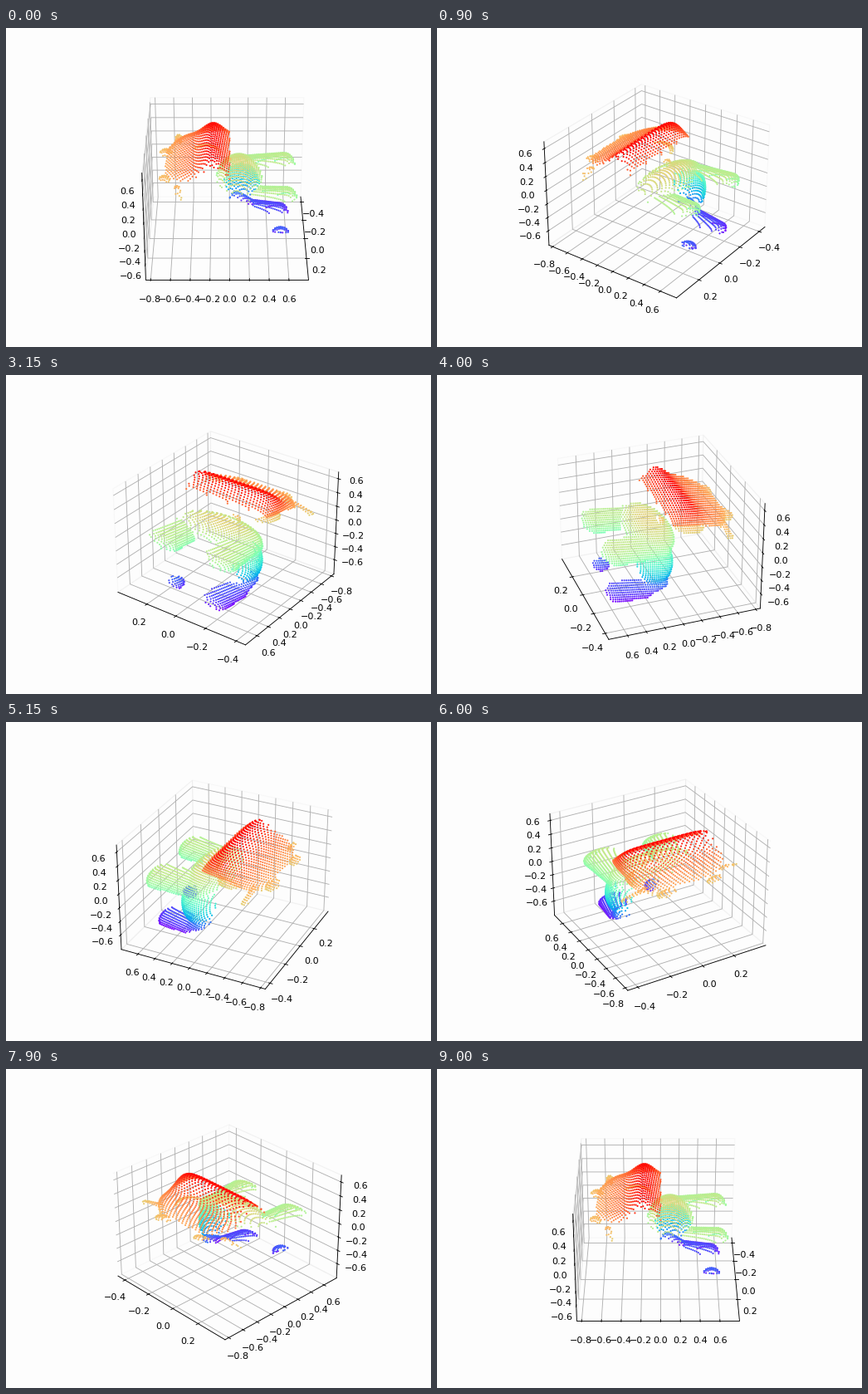
Write a matplotlib script that moves like this. It is 512x384 px and loops after 9050 ms.

```python
import numpy as np
import matplotlib.pyplot as plt
from matplotlib.animation import FuncAnimation

PAPER = "#fdfdfd"
FRAMES = 181
STEP = 0.0195


# --- solids: each returns a function that is negative inside ---
def ellipsoid(center, radii):
    c, r = np.array(center), np.array(radii)
    return lambda p: (((p - c) / r) ** 2).sum(-1) - 1


def capsule(a, b, radius):
    a, b = np.array(a), np.array(b)
    ab = b - a

    def f(p):
        t = np.clip((p - a) @ ab / (ab @ ab), 0, 1)
        return np.linalg.norm(p - a - t[..., None] * ab, axis=-1) - radius
    return f


def union(*parts):
    return lambda p: np.min([f(p) for f in parts], axis=0)


def shell(p):
    """Humped cover: a ridge along x, a bell-shaped profile along y."""
    x, y, z = p[..., 0], p[..., 1], p[..., 2]
    top = .42 - .6 * (y + .2) ** 2 + .17 * np.exp(-((y + .17) / .14) ** 2)
    half = .305 - 2.5 * np.clip(-.42 - y, 0, .24) ** 2
    base = .375 - .45 * y ** 2
    rise = np.clip(z - .2, 0, None) / np.maximum(top - .2, .01)
    body = np.abs((x + .015) / half) ** 6 + rise ** 4 - 1
    return np.maximum.reduce([body, base - z, y, -.66 - y])


def scan(solid, azim=np.radians(172), elev=np.radians(50)):
    """Depth-camera view of a solid: first hit along a grid of parallel rays."""
    ca, sa, ce, se = np.cos(azim), np.sin(azim), np.cos(elev), np.sin(elev)
    eye = np.array([ca * ce, sa * ce, se])
    right = np.array([-sa, ca, 0])
    up = np.array([-ca * se, -sa * se, ce])
    g = np.arange(-0.95, 0.95, STEP)
    u, v = (m.ravel()[:, None] for m in np.meshgrid(g, g))
    start = u * right + v * up
    depth = np.linspace(0.85, -0.85, 171)
    hit = np.full(len(start), np.nan)
    for t in depth:
        todo = np.flatnonzero(np.isnan(hit))
        inside = solid(start[todo] + t * eye) < 0
        hit[todo[inside]] = t
    ok = ~np.isnan(hit)
    start, low = start[ok], hit[ok]
    high = low + depth[0] - depth[1]
    for _ in range(7):
        mid = (low + high) / 2
        inside = solid(start + mid[:, None] * eye) < 0
        low, high = np.where(inside, mid, low), np.where(inside, high, mid)
    return start + low[:, None] * eye


seat = union(
    ellipsoid((-.02, .10, .03), (.27, .24, .17)),
    capsule((-.09, 0, .15), (-.09, -.01, .22), .03),
    capsule((-.18, .08, -.01), (-.20, .58, .015), .115),
    capsule((.15, .08, -.01), (.17, .58, .005), .11),
    ellipsoid((-.18, .13, -.22), (.12, .19, .33)),
    capsule((-.19, .08, -.50), (-.17, .25, -.62), .08),
    capsule((-.17, .25, -.62), (-.15, .54, -.64), .09),
)
cover = union(shell, ellipsoid((-.18, -.25, .20), (.10, .16, .07)))
tips = [
    capsule((-.26, -.55, .26), (-.37, -.55, .20), .035),
    capsule((.24, -.53, .24), (.32, -.51, .19), .035),
    ellipsoid((-.16, -.67, .22), (.06, .07, .045)),
    ellipsoid((.14, -.67, .22), (.06, .06, .045)),
]
toe = ellipsoid((.11, .53, -.58), (.05, .09, .07))
pts = np.concatenate([scan(s) for s in [seat, cover, toe, *tips]])

fig = plt.figure(figsize=(6.4, 4.8), dpi=80, facecolor=PAPER)
ax = fig.add_subplot(projection="3d", facecolor="none")
ax.scatter(*pts.T, c=pts[:, 2], cmap="rainbow", s=3.8, linewidths=0, depthshade=False)

ax.set_xticks(np.arange(-2, 2) / 5)
ax.set_yticks(np.arange(-4, 4) / 5)
ax.set_zticks(np.arange(-3, 4) / 5)
ax.set(xlim=(-.460, .406), ylim=(-.85, .798), zlim=(-.819, .696))
for axis in (ax.xaxis, ax.yaxis, ax.zaxis):
    axis.pane.set_fill(False)


def draw(i):
    ax.view_init(elev=30, azim=2 * i % 360)
    return ()


anim = FuncAnimation(fig, draw, frames=FRAMES, interval=50, repeat=True, repeat_delay=0)
plt.show()
```
